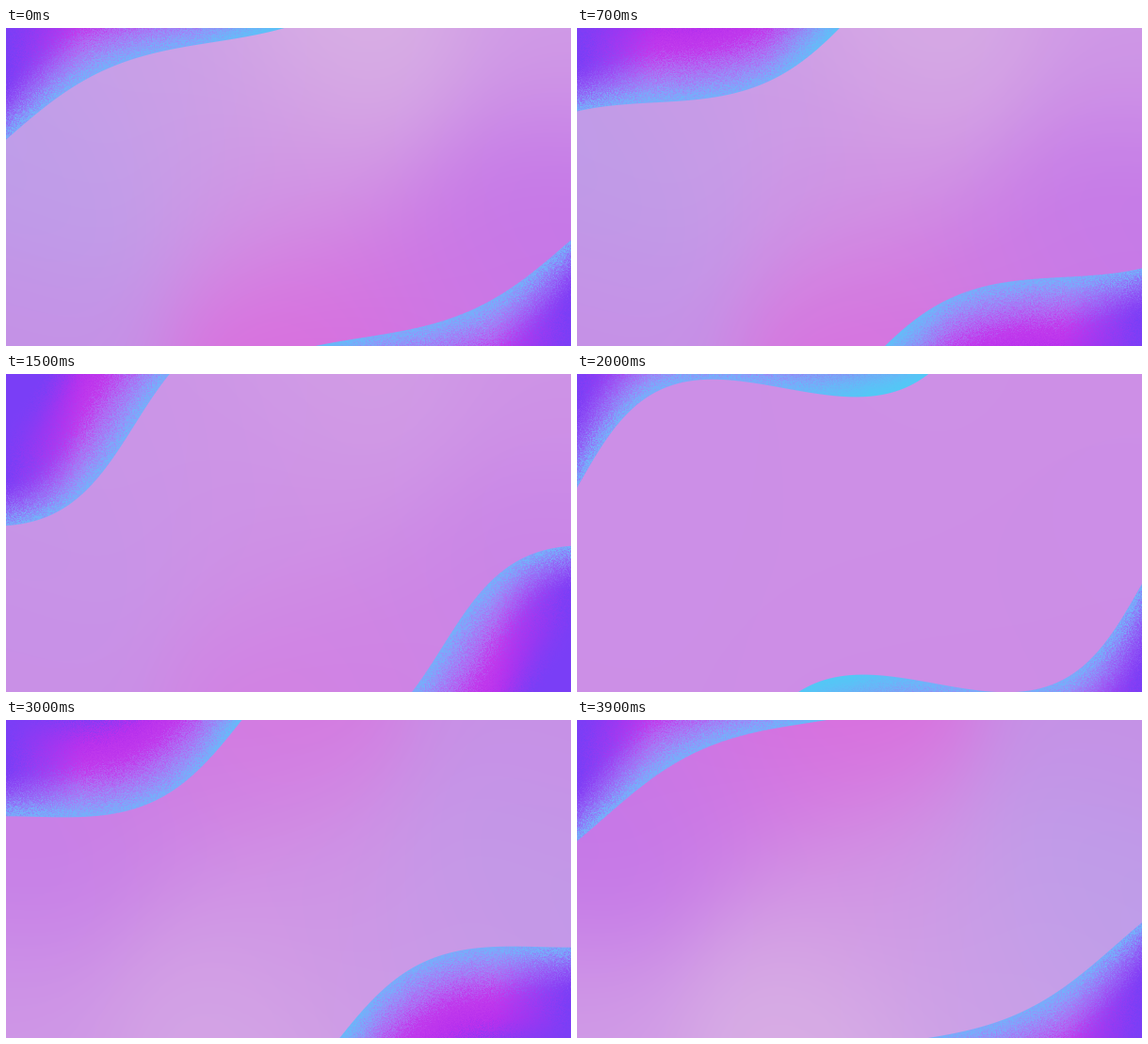
An HTML page with a canvas that plays this animation: 600 px wide and 338 px high, repeating every 4000 ms.

```html
<!DOCTYPE html>
<html lang="en">
<head>
<meta charset="utf-8">
<title>Gradient waves</title>
<style>
  html, body { margin: 0; width: 100%; height: 100%; overflow: hidden; background: #cd8fe7; }
  canvas { display: block; width: 600px; height: 338px; }
</style>
</head>
<body>
<canvas id="stage" width="600" height="338"></canvas>
<script>
const W = 600, H = 338, LOOP = 4000, STEP = 100;
const WAVE_W = 400, WAVE_H = 180, TILT = 25 * Math.PI / 180;
const WAVELENGTH = 480, K = 2 * Math.PI / WAVELENGTH;
const COS = Math.cos(TILT), SIN = Math.sin(TILT);

const clamp = x => Math.max(0, Math.min(1, x));
const mix = (a, b, k) => a.map((v, i) => v + (b[i] - v) * k);

function makeCanvas(w, h) {
  const c = document.createElement('canvas');
  c.width = w;
  c.height = h;
  return c;
}

const ctx = document.getElementById('stage').getContext('2d');

// Background: soft blend of a few colour points.
const PALETTE = [
  { x: 370, y: 25, c: [217, 178, 228] },
  { x: 60, y: 150, c: [189, 157, 233] },
  { x: 340, y: 335, c: [218, 108, 221] },
  { x: 565, y: 190, c: [196, 118, 232] },
  { x: 600, y: 0, c: [208, 155, 230] },
  { x: 0, y: 338, c: [197, 145, 230] },
  { x: 300, y: 160, c: [208, 147, 228] },
  { x: 170, y: 60, c: [203, 160, 231] },
  { x: 480, y: 295, c: [203, 120, 229] }
];

function makeMesh() {
  const c = makeCanvas(W, H), g = c.getContext('2d');
  const img = g.createImageData(W, H);
  for (let y = 0, i = 0; y < H; y++) {
    for (let x = 0; x < W; x++, i += 4) {
      let total = 0, r = 0, gr = 0, b = 0;
      for (const p of PALETTE) {
        const w = Math.exp(-((x - p.x) ** 2 + (y - p.y) ** 2) / 15500);
        total += w;
        r += w * p.c[0];
        gr += w * p.c[1];
        b += w * p.c[2];
      }
      img.data[i] = r / total;
      img.data[i + 1] = gr / total;
      img.data[i + 2] = b / total;
      img.data[i + 3] = 255;
    }
  }
  g.putImageData(img, 0, 0);
  return c;
}

// Wave colours by depth below the wave's edge.
const CYAN = [82, 200, 246], VIOLET = [122, 62, 246];
const DEPTHS = [
  [0, [116, 176, 250]], [12, [145, 150, 249]], [32, [174, 108, 243]],
  [54, [193, 58, 236]], [80, [184, 48, 237]], [115, VIOLET]
];

function depthColor(d) {
  if (d <= 0) return DEPTHS[0][1];
  for (let i = 1; i < DEPTHS.length; i++) {
    const [d0, c0] = DEPTHS[i - 1], [d1, c1] = DEPTHS[i];
    if (d < d1) return mix(c0, c1, (d - d0) / (d1 - d0));
  }
  return VIOLET;
}

function makeGrain(n) {
  let seed = 7;
  const rnd = () => (seed = seed * 16807 % 2147483647) / 2147483647;
  return Float32Array.from({ length: n }, () => rnd() + rnd() - 1);
}

const mesh = makeMesh();
const grain = makeGrain(WAVE_W * WAVE_H);
const wave = makeCanvas(WAVE_W, WAVE_H);
const waveCtx = wave.getContext('2d');
const waveImg = waveCtx.createImageData(WAVE_W, WAVE_H);

// A sine on a tilted axis; its crest drifts left while its height swells.
function paintWave(s) {
  const amp = 38 - 16 * Math.cos(Math.PI * s / 2);
  const crest = 329 - 240 * s - 20 * Math.cos(Math.PI * (s - 0.2));
  const px = waveImg.data;
  for (let y = 0, n = 0; y < WAVE_H; y++) {
    for (let x = 0; x < WAVE_W; x++, n++) {
      const i = n * 4;
      const u = COS * x - SIN * y, v = SIN * x + COS * y;
      const phase = K * (u - crest);
      const slope = amp * K * Math.sin(phase);
      const d = (106 + amp * Math.cos(phase) - v) / Math.hypot(1, slope);
      px[i + 3] = 255 * clamp(d + 0.5);
      if (d < -0.5) continue;
      const noisy = d + grain[n] * 13;
      let c = depthColor(noisy);
      c = mix(c, VIOLET, clamp(1 - (x + grain[n] * 14) / 80) * clamp(noisy / 45));
      c = mix(c, CYAN, clamp((x - 200) / 110) * clamp(1 - d / 60));
      px[i] = c[0];
      px[i + 1] = c[1];
      px[i + 2] = c[2];
    }
  }
  waveCtx.putImageData(waveImg, 0, 0);
}

function rotated(image, w, h) {
  ctx.save();
  ctx.translate(w, h);
  ctx.scale(-1, -1);
  ctx.drawImage(image, 0, 0);
  ctx.restore();
}

function draw(ms) {
  const s = ms / 1000;
  const strength = Math.cos(Math.PI * s / 4.1);
  ctx.fillStyle = 'rgb(205,143,231)';
  ctx.fillRect(0, 0, W, H);
  ctx.globalAlpha = Math.abs(strength);
  if (strength > 0) ctx.drawImage(mesh, 0, 0);
  else rotated(mesh, W, H);
  ctx.globalAlpha = 1;

  paintWave(s);
  ctx.drawImage(wave, 0, 0);
  rotated(wave, W, H + 6);
}

const start = performance.now();
let shown = -1;

function tick() {
  const elapsed = (performance.now() - start) % LOOP;
  const ms = Math.floor(elapsed / STEP) * STEP;
  if (ms !== shown) draw(shown = ms);
  requestAnimationFrame(tick);
}
tick();
</script>
</body>
</html>
```
